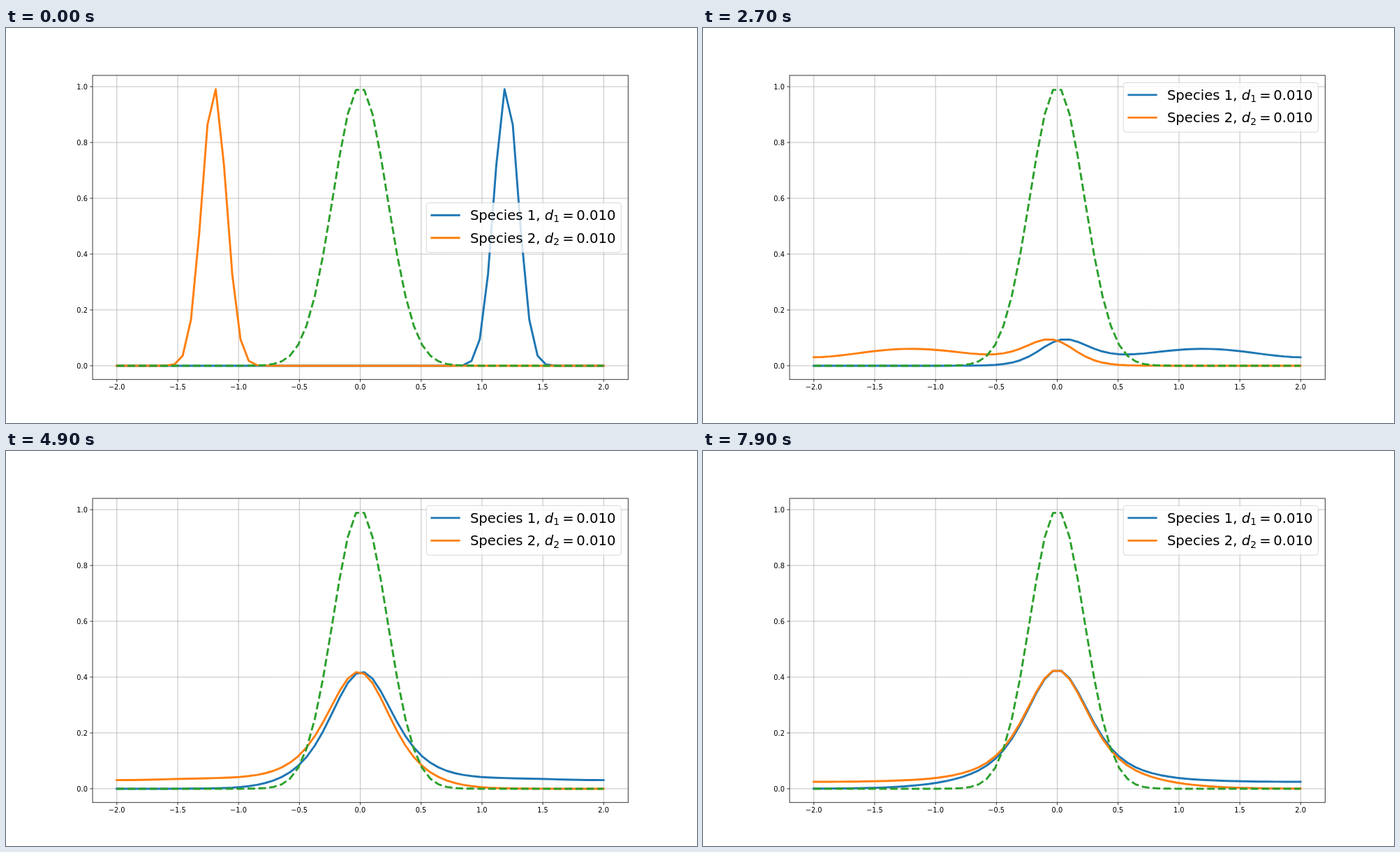
An HTML page with a canvas for the animation above (8 s loop, 990 px wide and 566 px high).

```html
<!DOCTYPE html>
<html lang="en">
<head>
<meta charset="utf-8">
<title>Two competing species</title>
<style>
html, body { margin: 0; width: 100%; height: 100%; overflow: hidden; background: #fff; }
canvas { display: block; }
</style>
</head>
<body>
<canvas id="stage" width="990" height="566"></canvas>
<script>
const ctx = document.getElementById('stage').getContext('2d');

const FRAMES = 80, FRAME_MS = 100;
const BLUE = '#1f77b4', ORANGE = '#ff7f0e', GREEN = '#2ca02c';
const BOX = { l: 123.75, r: 891, t: 67.92, b: 503.74 };
const PT = 990 / 14 / 72;            // one point in pixels
const FONT = '"DejaVu Sans", Verdana, sans-serif';

const px = x => 507.375 + 174.375 * x;
const py = y => 483.93 - 399.86 * y;

// --- model: u' = d u'' + u (m - u - v), v being the mirror image of u ---
const N = 60, D = 0.01, H = 4 / (N - 1);
const xs = Array.from({ length: N }, (_, i) => -2 + H * i);
const resource = xs.map(x => Math.exp(-10 * x * x));
const start = () => xs.map(x => Math.exp(-50 * (x - 1.2) ** 2));

function advance(u, dt) {
  return u.map((c, i) => {
    const a = u[Math.max(i - 1, 0)], b = u[Math.min(i + 1, N - 1)];
    return c + dt * (D * (a - 2 * c + b) / (H * H) + c * (resource[i] - c - u[N - 1 - i]));
  });
}

// Model time per frame: the central hump reaches 0.0936 after 27 frames.
function frameStep() {
  const dt = 0.008;
  let u = start(), t = 0;
  while (u[31] < 0.0936 && t < 14) { u = advance(u, dt); t += dt; }
  return t / 27;
}

function simulate() {
  const sub = 45, dt = frameStep() / sub, out = [start()];
  while (out.length < FRAMES) {
    let u = out[out.length - 1];
    for (let i = 0; i < sub; i++) u = advance(u, dt);
    out.push(u);
  }
  return out;
}
const states = simulate();

// --- drawing ---
function line(x1, y1, x2, y2, color, width) {
  ctx.strokeStyle = color;
  ctx.lineWidth = width;
  ctx.beginPath();
  ctx.moveTo(x1, y1);
  ctx.lineTo(x2, y2);
  ctx.stroke();
}

function text(str, x, y, size, align = 'left', style = '') {
  ctx.font = `${style} ${size}px ${FONT}`;
  ctx.textAlign = align;
  ctx.fillStyle = '#000';
  ctx.fillText(str, x, y);
}

function curve(values, color, dash = []) {
  ctx.save();
  ctx.strokeStyle = color;
  ctx.lineWidth = 3 * PT;
  ctx.lineJoin = 'round';
  ctx.lineCap = dash.length ? 'butt' : 'square';
  ctx.setLineDash(dash.map(v => v * 3 * PT));
  ctx.beginPath();
  values.forEach((v, i) => ctx.lineTo(px(xs[i]), py(v)));
  ctx.stroke();
  ctx.restore();
}

function axes() {
  const w = 0.8 * PT, tick = 3.5 * PT, size = 10 * PT;
  const label = v => v.toFixed(1).replace('-', '\u2212');
  for (let i = -4; i <= 4; i++) {
    const x = px(i / 2) + 0.2;
    line(x, BOX.t, x, BOX.b, '#b0b0b0', w);
    line(x, BOX.b, x, BOX.b + tick, '#000', w);
    text(label(i / 2), px(i / 2), 518.3, size, 'center');
  }
  for (let i = 0; i <= 5; i++) {
    const y = py(i / 5);
    line(BOX.l, y, BOX.r, y, '#b0b0b0', w);
    line(BOX.l - tick, y, BOX.l, y, '#000', w);
    text(label(i / 5), BOX.l - 2 * tick, y + 3.6, size, 'right');
  }
}

function frame() {
  ctx.strokeStyle = '#000';
  ctx.lineWidth = 0.8 * PT;
  ctx.strokeRect(BOX.l + 0.3, BOX.t, BOX.r - BOX.l, BOX.b - BOX.t);
}

function legendRow(n, y, color) {
  const size = 20 * PT, base = y + 6.9;
  ctx.lineCap = 'square';
  line(609.9, y, 649.2, y, color, 3 * PT);
  ctx.lineCap = 'butt';
  text(`Species ${n}, `, 664.9, base, size);
  text('d', 771.8, base, size, 'left', 'italic');
  text(n, 784.3, base + 3.2, size * 0.7);
  text('=', 797.2, base, size);
  text('0.010', 817.2, base, size);
}

function legend(top) {
  ctx.beginPath();
  ctx.roundRect(602.2, top, 279.2, 70.9, 4);
  ctx.fillStyle = 'rgba(255,255,255,0.8)';
  ctx.fill();
  ctx.strokeStyle = 'rgba(204,204,204,0.8)';
  ctx.lineWidth = PT;
  ctx.stroke();
  legendRow(1, top + 17.6, BLUE);
  legendRow(2, top + 50.1, ORANGE);
}

function draw(k) {
  const u = states[k];
  ctx.fillStyle = '#fff';
  ctx.fillRect(0, 0, 990, 566);
  axes();
  curve(u, BLUE);
  curve([...u].reverse(), ORANGE);
  curve(resource, GREEN, [3.7, 1.6]);
  frame();
  legend(k === 0 ? 250.6 : 78.3);   // moves clear of the tall first peak
}

function tick() {
  draw(Math.floor(performance.now() / FRAME_MS) % FRAMES);
  requestAnimationFrame(tick);
}
tick();
</script>
</body>
</html>
```
